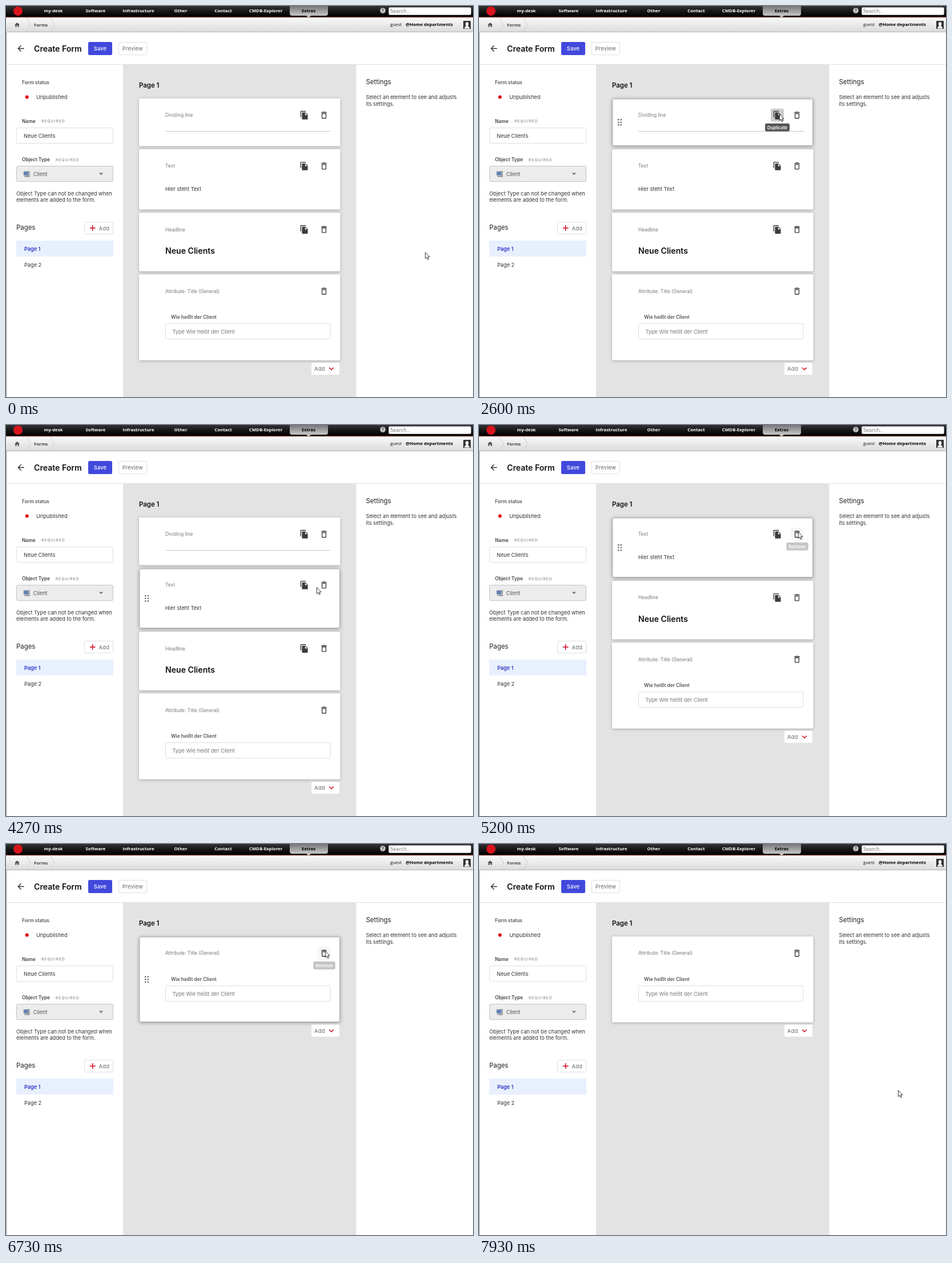
Write an HTML page that moves like this. It is 818 px wide and 685 px high and loops after 8000 ms.

```html
<!DOCTYPE html>
<html lang="en">
<head>
<meta charset="utf-8">
<title>Create Form</title>
<style>
html, body { margin: 0; width: 100%; height: 100%; overflow: hidden; background: #fff; }
svg { display: block; width: 100%; height: 100%; font-family: Inter, sans-serif; }
text { white-space: pre; }
.nav { font-family: "Open Sans", sans-serif; }
.card { fill: #fff; filter: drop-shadow(0 1.5px 2.5px rgba(0,0,0,.27)); }
.card.hover { stroke: #b4b4b4; filter: drop-shadow(0 1.5px 3px rgba(0,0,0,.36)); }
.card.selected { stroke: #1a1aa6; stroke-width: 1.6; }
</style>
</head>
<body>
<svg viewBox="0 0 818 685" xmlns="http://www.w3.org/2000/svg">
  <defs>
    <linearGradient id="bar" x2="0" y2="1"><stop stop-color="#343434"/><stop offset=".5" stop-color="#161616"/><stop offset="1" stop-color="#000"/></linearGradient>
    <linearGradient id="tab" x2="0" y2="1"><stop stop-color="#777"/><stop offset="1" stop-color="#c6c6c6"/></linearGradient>
    <linearGradient id="crumb" x2="0" y2="1"><stop stop-color="#fafafa"/><stop offset="1" stop-color="#dadada"/></linearGradient>
  </defs>
  <g id="frame"></g>
  <g id="cards"></g>
  <g id="side"></g>
  <g id="top"></g>
</svg>
<script>
const LOOP = 8000, FPS = 15, TICK = 1000 / FPS;

const ICON = {
  copy: 'M16 1H4c-1.1 0-2 .9-2 2v14h2V3h12V1zm-1 4l6 6v10c0 1.1-.9 2-2 2H7.99C6.89 23 6 22.1 6 21V7c0-1.1.89-2 1.99-2h7zm-1 7h5.5L14 6.5V12z',
  trash: 'M6 19c0 1.1.9 2 2 2h8c1.1 0 2-.9 2-2V7H6v12zM8 9h8v10H8V9zm7.5-5l-1-1h-5l-1 1H5v2h14V4z',
  chevron: 'M16.59 8.59L12 13.17 7.41 8.59 6 10l6 6 6-6z',
  plus: 'M19 13h-6v6h-2v-6H5v-2h6V5h2v6h6v2z',
  back: 'M20 11H7.83l5.59-5.59L12 4l-8 8 8 8 1.41-1.41L7.83 13H20v-2z',
  drop: 'M7 10l5 5 5-5z',
  home: 'M10 20v-6h4v6h5v-8h3L12 3 2 12h3v8z'
};

// cursor path: time, x, y
const PATH = [
  [0, 734, 431], [200, 734, 431], [400, 727, 427], [600, 727, 427], [733, 740, 412],
  [867, 712, 350], [1000, 660, 262], [1133, 602, 200], [1267, 556, 173], [1467, 527, 187],
  [1933, 527, 187], [2000, 526, 188], [2267, 526, 188], [2333, 526, 189], [3267, 526, 189],
  [3400, 531, 225], [3533, 539, 268], [3800, 544, 284], [4600, 544, 284], [4800, 559, 187],
  [7133, 559, 187], [7267, 522, 195], [7400, 385, 250], [7533, 250, 322], [7667, 180, 370],
  [7800, 152, 394], [7933, 136, 432]
];

// cards in the form, by first letter of their kind
const SCENES = [
  { at: 0, kinds: 'DTHA' },
  { at: 2667, kinds: 'DDTHA', selected: 1 },
  { at: 4200, kinds: 'DTHA' },
  { at: 5200, kinds: 'THA' },
  { at: 5867, kinds: 'HA' },
  { at: 6733, kinds: 'A' }
];

const TIPS = [
  { text: 'Duplicate', x: 522.5, y: 212.8, from: 1533, to: 3533 },
  { text: 'Remove', x: 550, y: 302, from: 3867, to: 4200, cut: 4267 },
  { text: 'Remove', x: 557.5, y: 212.8, from: 4867, to: 9000, cut: 5200 },
  { text: 'Remove', x: 557.5, y: 212.8, from: 5200, to: 9000, cut: 5867 },
  { text: 'Remove', x: 557.5, y: 212.8, from: 5867, to: 9000, cut: 6733 },
  { text: 'Remove', x: 557.5, y: 212.8, from: 6733, to: 7200 }
];

const PRESSES = [[2467, 2667], [5733, 5867], [6667, 6733]];
const HEIGHT = { D: 83.5, T: 105.5, H: 102.5, A: 150.5 };
const LABEL = { D: 'Dividing line', T: 'Text', H: 'Headline', A: 'Attribute: Title (General)' };
const GAP = 5.6, LEFT = 233, TOP = 162;

const $ = id => document.getElementById(id);
const clamp = v => Math.max(0, Math.min(1, v));
const ramp = (t, start) => clamp((t - start + TICK) / (3 * TICK));

const rect = (x, y, w, h, fill, extra = '') =>
  `<rect x="${x}" y="${y}" width="${w}" height="${h}" fill="${fill}" ${extra}/>`;
const box = (x, y, w, h, fill, stroke) =>
  rect(x + .5, y + .5, w - 1, h - 1, fill, `rx="2" stroke="${stroke}"`);
const icon = (name, x, y, size, fill) =>
  `<path d="${ICON[name]}" fill="${fill}" transform="translate(${x} ${y}) scale(${size / 24}) translate(-12 -12)"/>`;
// y is the middle of the capitals
const text = (x, y, s, size = 9.18, fill = '#333', weight = 400, extra = '') =>
  `<text x="${x}" y="${y + size * .364}" font-size="${size}" fill="${fill}" font-weight="${weight}" ${extra}>${s}</text>`;
const navText = (x, y, s, fill, weight = 700, anchor = 'middle') =>
  text(x, y, s, 7.8, fill, weight, `class="nav" text-anchor="${anchor}"`);
const dots = (x, y, gap, r) => [-1, 0, 1].map(row => [-.5, .5].map(col =>
  `<circle cx="${x + col * gap}" cy="${y + row * gap}" r="${r}" fill="#6c6c6c"/>`).join('')).join('');

function drawFrame() {
  const nav = [[83, 'my-desk'], [157, 'Software'], [232, 'Infrastructure'], [306, 'Other'],
    [380.5, 'Contact'], [455, 'CMDB-Explorer']];
  $('frame').innerHTML = [
    rect(0, 0, 818, 685, '#fff'),
    rect(205, 103, 408.5, 582, '#e3e3e3'),
    rect(0, 20, 818, 26, 'url(#crumb)'),
    rect(0, 45, 818, 1, '#b4b4b4'),
    rect(0, 46, 1, 639, '#8c8c8c'),
    rect(1, 102, 817, 1, '#e0e0e0'),
    rect(0, 0, 818, 19, 'url(#bar)'),
    rect(0, 19, 818, 1.3, '#8d4a40'),
    '<circle cx="21" cy="9" r="8" fill="#d8141c"/>',
    nav.map(([x, s]) => navText(x, 8, s, '#fff')).join(''),
    '<path d="M497 0H564V13Q564 17 560 17H501Q497 17 497 13Z" fill="url(#tab)"/>',
    '<path d="M526 17H534L530 21Z" fill="#c0c0c0"/>',
    navText(530, 8.3, 'Extras', '#000'),
    '<circle cx="660" cy="8" r="4.8" fill="#c4c4c4"/>',
    text(660, 8, '?', 7, '#444', 700, 'text-anchor="middle"'),
    box(670, 2, 145, 14, '#fff', '#aaa'),
    text(673, 8.8, 'Search..', 8.3, '#777', 400, 'style="font-family:\'DejaVu Sans\',sans-serif"'),
    icon('home', 19.5, 33, 11, '#555'),
    '<path d="M36 21L43 33L36 45M78 21L85 33L78 45" fill="none" stroke="#cfcfcf"/>',
    navText(49, 33, 'Forms', '#444', 700, 'start'),
    navText(673, 32.5, 'guest', '#111', 400, 'start'),
    navText(700, 32.5, '@Home departments', '#000', 700, 'start'),
    rect(801, 26, 13, 14, '#333'),
    '<path d="M803 39.5Q803 36 806 35.3Q804.5 33.5 804.7 30.5Q805 28 807.5 28T810.3 30.5Q810.5 33.5 809 35.3Q812 36 812 39.5Z" fill="#f2f2f2"/>',

    icon('back', 26, 74.5, 17, '#333'),
    text(49, 74.5, 'Create Form', 14.1, '#111', 600),
    rect(144, 63, 42, 23, '#4149dc', 'rx="2.5"'),
    text(165, 74.8, 'Save', 9.3, '#fff', 500, 'text-anchor="middle" letter-spacing=".15"'),
    box(197, 63, 50, 23, '#fff', '#dedede'),
    text(222, 74.8, 'Preview', 9.3, '#666', 400, 'text-anchor="middle" letter-spacing=".2"'),

    text(28, 134, 'Form status', 8.4, '#555', 600),
    '<circle cx="36.7" cy="159.5" r="3" fill="#e00010"/>',
    text(53, 160, 'Unpublished'),
    text(28, 201.5, 'Name', 8.4, '#444', 600),
    text(62, 201.8, 'REQUIRED', 6.6, '#777', 400, 'letter-spacing="1.1"'),
    box(18, 213, 170, 28, '#fff', '#dfdfdf'),
    text(31, 227.3, 'Neue Clients'),
    text(28, 269, 'Object Type', 8.4, '#444', 600),
    text(87, 269.2, 'REQUIRED', 6.6, '#777', 400, 'letter-spacing="1.1"'),
    box(18, 280, 170, 28, '#ececec', '#c2c2c2'),
    rect(37, 289, 5, 11, '#a9adb3'),
    rect(31, 290, 8, 6.5, '#5f7fb8', 'stroke="#9aa0a8" stroke-width=".8"'),
    rect(32, 297.5, 8, 2, '#8f949c'),
    text(47.5, 294.4, 'Client', 9.18, '#555'),
    icon('drop', 166.5, 294, 18, '#777'),
    text(18, 328.3, 'Object Type can not be changed when'),
    text(18, 340, 'elements are added to the form.'),
    text(18, 388, 'Pages', 11.4, '#222'),
    text(32, 453.2, 'Page 2'),
    text(233, 138.8, 'Page 1', 11.4, '#111', 600),
    text(630.5, 133, 'Settings', 11.4, '#222')
  ].join('');
}

function cursorAt(t) {
  const i = Math.max(1, PATH.findIndex(p => p[0] >= t));
  const [t0, x0, y0] = PATH[i - 1], [t1, x1, y1] = PATH[i];
  const k = clamp((t - t0) / (t1 - t0));
  return { x: Math.round(x0 + (x1 - x0) * k), y: Math.round(y0 + (y1 - y0) * k) };
}

const inside = (p, x, y, w, h) => p.x >= x && p.x <= x + w && p.y >= y && p.y <= y + h;

function iconButton(name, x, y, pointer, press, fade) {
  const hover = inside(pointer, x - 11.5, y - 11.5, 23, 23);
  const shade = hover ? rect(x - 11.5, y - 11.5, 23, 23, '#000', `rx="3" opacity="${press ? .2 : .09 * fade}"`) : '';
  return shade + icon(name, x, y, 16.3, '#3c3c3c');
}

function card(kind, y, width, selected, pointer, press, fade) {
  const h = HEIGHT[kind], right = LEFT + width, lineWidth = right - 17 - 279;
  const hover = inside(pointer, LEFT, y, width, h);
  const inset = selected ? .8 : hover ? 1 : 0;
  const style = selected ? 'selected' : hover ? 'hover' : '';
  const body = {
    D: () => rect(279, y + 57, lineWidth, 1, '#c6c6c6'),
    T: () => text(279, y + 69.5, 'Hier steht Text'),
    H: () => text(279, y + 66.3, 'Neue Clients', 14.1, '#111', 600),
    A: () => text(289, y + 74.7, 'Wie heißt der Client', 8.4, '#555', 600) +
      box(279, Math.round(y + 86), lineWidth, 28, '#fff', '#dedede') +
      text(291.5, y + 100.3, 'Type Wie heißt der Client', 9.18, '#777')
  }[kind]();
  return rect(LEFT + inset, y + inset, width - 2 * inset, h - 2 * inset, '#fff', `rx="2" class="card ${style}"`) +
    (hover ? dots(246.5, y + h / 2, 4.6, 1.35) : '') +
    text(279, y + 29.3, LABEL[kind], 8.4, '#777') + body +
    (kind === 'A' ? '' : iconButton('copy', right - 63, y + 29.3, pointer, press, fade)) +
    iconButton('trash', right - 28.5, y + 29.3, pointer, press, fade);
}

function drawCards(t, pointer) {
  const scene = SCENES.filter(s => s.at <= t + 5).pop();
  const press = PRESSES.some(([a, b]) => t + 5 >= a && t + 5 < b);
  const fade = ramp(t, scene.at);
  const scrolls = scene.kinds.length > 4, width = scrolls ? 345.5 : 352.5;
  let y = TOP, out = '';
  [...scene.kinds].forEach((kind, i) => {
    out += card(kind, y, width, scene.selected === i, pointer, press, fade);
    y += HEIGHT[kind] + GAP;
  });
  out += rect(535, y - 1.5, 49, 21, '#fff', 'rx="2"') +
    text(540, y + 9.2, 'Add', 9.3, '#666', 400, 'letter-spacing=".3"') +
    icon('chevron', 570, y + 9, 17, '#d0021b');
  if (scrolls) out += rect(606.5, 103, 7, 513, '#757575', 'rx="3"');
  out += scene.selected === undefined
    ? text(630.5, 160, 'Select an element to see and adjusts') + text(630.5, 171.3, 'its settings.')
    : text(630.5, 160, 'No settings available for Dividing line.');
  return out;
}

function drawSide(t, pointer) {
  const onPage = inside(pointer, 18, 411, 170, 28);
  const addShade = inside(pointer, 137, 378, 50, 22) || onPage;
  return box(137, 378, 51, 22, addShade ? '#ececec' : '#fff', '#dedede') +
    icon('plus', 151.7, 389, 17, '#d0021b') +
    text(162.5, 389.3, 'Add', 9.3, '#666', 400, 'letter-spacing=".3"') +
    rect(18, 411, 170, 28, onPage ? '#ececec' : '#e8f0fe') +
    (onPage ? dots(25.2, 425, 3.6, 1) : '') +
    text(32, 425.2, 'Page 1', 9.18, onPage ? '#222' : '#3338c4', 600);
}

function drawTop(t, pointer) {
  const tips = TIPS.map(tip => {
    const alpha = t + 5 >= (tip.cut || LOOP) ? 0 : Math.min(ramp(t, tip.from), 1 - ramp(t, tip.to));
    if (alpha <= 0) return '';
    const w = tip.text === 'Remove' ? 38.5 : 43;
    return `<g opacity="${alpha.toFixed(2)}">` + rect(tip.x - w / 2, tip.y - 7, w, 14, '#555', 'rx="3"') +
      text(tip.x, tip.y, tip.text, 7.7, '#fff', 600, 'text-anchor="middle"') + '</g>';
  }).join('');
  const hand = inside(pointer, 18, 411, 170, 28);
  const shape = hand
    ? 'M-.8 .8Q-.8 -.6 .5 -.6T1.8 .8V5.2Q3.4 4.4 4.2 5.7Q5.8 5 6.4 6.3Q8 5.9 8 7.6V11Q8 12.6 6.8 14V15.8H.2V14.3L-3.4 9.8Q-4.2 8.2 -3 7.7Q-2 7.4 -.8 9Z'
    : 'M.4 .6V11.6L2.9 9.3L4.6 13.2L6.4 12.4L4.7 8.6H8.1Z';
  return tips + `<path d="${shape}" transform="translate(${pointer.x} ${pointer.y})" fill="#fff" stroke="#222" stroke-width=".9" stroke-linejoin="round"/>`;
}

let shown = -1;
function render(now) {
  const step = Math.floor((now % LOOP) / TICK + .1) % (LOOP / TICK);
  if (step !== shown) {
    shown = step;
    const t = step * TICK, pointer = cursorAt(t);
    $('cards').innerHTML = drawCards(t, pointer);
    $('side').innerHTML = drawSide(t, pointer);
    $('top').innerHTML = drawTop(t, pointer);
  }
}

drawFrame();
render(0);
const start = performance.now();
(function loop() {
  render(Math.max(0, performance.now() - start));
  requestAnimationFrame(loop);
})();
</script>
</body>
</html>
```
